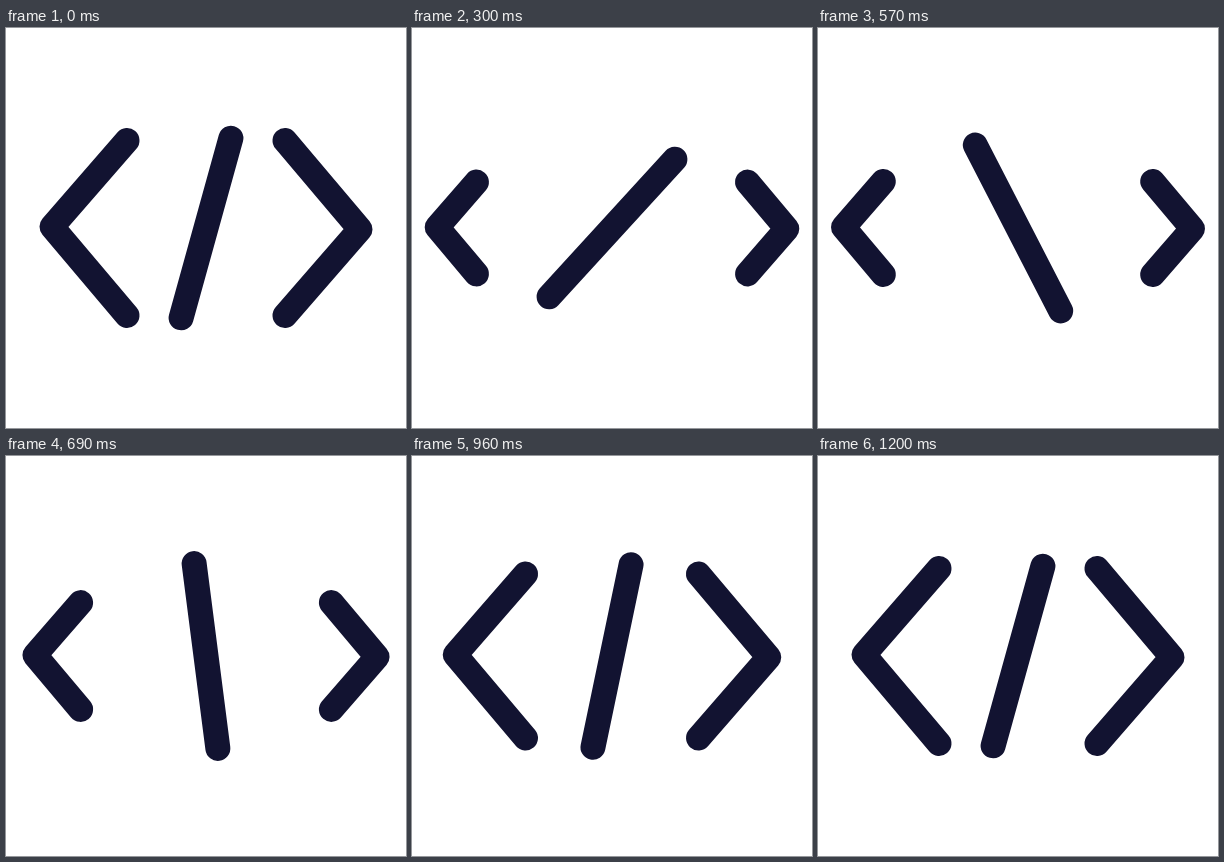
These frames come from a looping animation (400x400 px, 3.23 s). An HTML page with a canvas:

```html
<!DOCTYPE html>
<html lang="en">
<head>
<meta charset="utf-8">
<title>Code icon</title>
<style>
html, body { margin: 0; width: 100%; height: 100%; overflow: hidden; background: #fff; }
canvas { display: block; width: 400px; height: 400px; }
</style>
</head>
<body>
<canvas id="stage"></canvas>
<script>
const LOOP = 3230, MOVE = 1200, STEP = 30;
const canvas = document.getElementById('stage');
const ctx = canvas.getContext('2d');
const dpr = window.devicePixelRatio || 1;
canvas.width = canvas.height = 400 * dpr;

const mix = (a, b, p) => a + (b - a) * p;

// Ease along cubic-bezier(x1, 0, x2, 1) between two times.
function ease(t, from, to, x1, x2) {
  const x = (t - from) / (to - from);
  if (x <= 0) return 0;
  if (x >= 1) return 1;
  let lo = 0, hi = 1;
  for (let i = 0; i < 30; i++) {
    const u = (lo + hi) / 2, v = 1 - u;
    if (3 * u * v * v * x1 + 3 * u * u * v * x2 + u * u * u < x) lo = u;
    else hi = u;
  }
  return lo * lo * (3 - 2 * lo);
}

function line(...points) {
  ctx.beginPath();
  for (const [x, y] of points) ctx.lineTo(x, y);
  ctx.stroke();
}

function chevron(side, p) {
  const tip = mix(154, 175.5, p), end = mix(79, 137.5, p);
  const reach = mix(87.5, 44.5, p), skew = mix(1.3, 0.7, p);
  line([side * end, -reach], [side * tip, side * skew], [side * end, reach]);
}

function draw(t) {
  ctx.setTransform(dpr, 0, 0, dpr, 0, 0);
  ctx.fillStyle = '#fff';
  ctx.fillRect(0, 0, 400, 400);
  ctx.translate(200, 200);
  ctx.strokeStyle = '#121331';
  ctx.lineWidth = 25;
  ctx.lineCap = ctx.lineJoin = 'round';

  const spread = ease(t, 0, 400, 0.5, 0.1) - ease(t, 425, MOVE, 0.56, 0.39);
  chevron(-1, spread);
  chevron(1, spread);

  ctx.rotate((15.5 + 180 * ease(t, 20, MOVE, 0.5, 0.1)) * Math.PI / 180);
  line([0, -93.2], [0, 93.2]);
}

const start = performance.now();
function tick() {
  const t = (performance.now() - start) % LOOP;
  draw(Math.min(MOVE, Math.floor(t / STEP) * STEP));
  requestAnimationFrame(tick);
}
tick();
</script>
</body>
</html>
```
